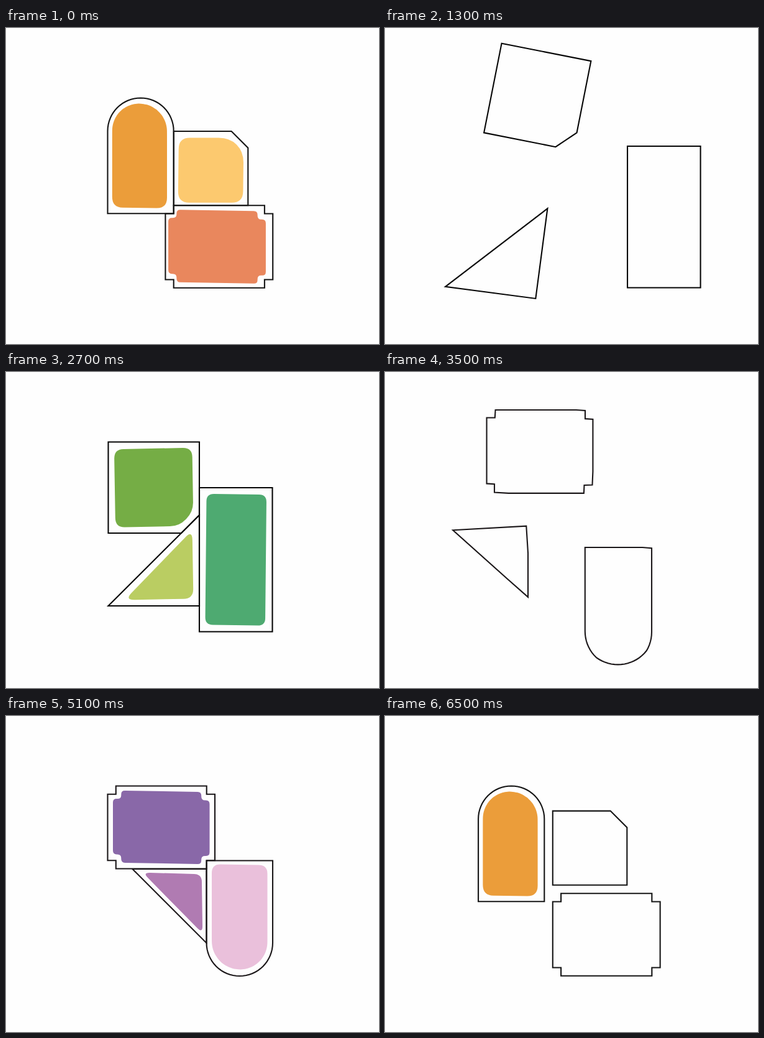
Recreate the animation shown at these times as an HTML page. Size 600 by 508 pixels, loop 6.6 s.

```html
<!DOCTYPE html>
<html lang="en">
<head>
<meta charset="utf-8">
<title>Shape blocks</title>
<style>
html, body { margin: 0; width: 100%; height: 100%; overflow: hidden; background: #fefefe; }
svg { display: block; width: 100%; height: 100%; }
</style>
</head>
<body>
<svg id="stage" viewBox="0 0 600 508"></svg>
<script>
const LOOP = 6600, STEP = 100, GAP = 13.4, HOLD = 100;
const stage = document.getElementById('stage');

// ---- helpers ----
const lerp = (a, b, k) => a + (b - a) * k;
const mix = (p, q, k) => p.map((v, i) => lerp(v, q[i], k));
const dist = (p, q) => Math.hypot(q[0] - p[0], q[1] - p[1]);
const ramp = (t, from, to) => Math.min(1, Math.max(0, (t - from) / (to - from)));
const easeOut = k => 1 - (1 - k) ** 3;
const smooth = k => k * k * (3 - 2 * k);
const around = (pts, i) => [pts.at(i - 1), pts[(i + 1) % pts.length]];

function center(pts) {
  return [0, 1].map(axis => {
    const v = pts.map(p => p[axis]);
    return (Math.min(...v) + Math.max(...v)) / 2;
  });
}

// ---- outlines, all clockwise ----
function arc(cx, cy, r, from) {
  return Array.from({ length: 33 }, (_, i) => {
    const a = from + Math.PI * i / 32;
    return [cx + r * Math.cos(a), cy + r * Math.sin(a)];
  });
}

const box = (x0, y0, x1, y1) => [[x0, y0], [x1, y0], [x1, y1], [x0, y1]];

function arch(x0, y0, x1, y1, down) {
  const r = (x1 - x0) / 2;
  return down
    ? [[x0, y0], [x1, y0], ...arc(x0 + r, y1 - r, r, 0)]
    : [...arc(x0 + r, y0 + r, r, Math.PI), [x1, y1], [x0, y1]];
}

function ticket(x0, y0, x1, y1, n = 13.3) {
  const [l, t, r, b] = [x0 + n, y0 + n, x1 - n, y1 - n];
  return [[x0, t], [l, t], [l, y0], [r, y0], [r, t], [x1, t],
    [x1, b], [r, b], [r, y1], [l, y1], [l, b], [x0, b]];
}

// Box with one corner cut off
function clipped(x0, y0, x1, y1, corner, cut) {
  const pts = box(x0, y0, x1, y1);
  const p = pts[corner];
  pts.splice(corner, 1, ...around(pts, corner).map(q => mix(p, q, cut / dist(p, q))));
  return pts;
}

// ---- fills: inset, lean a little, soften the corners ----
function inset(pts, d) {
  const normal = (p, q) => [(p[1] - q[1]) / dist(p, q), (q[0] - p[0]) / dist(p, q)];
  return pts.map((p, i) => {
    const [prev, next] = around(pts, i);
    const a = normal(prev, p), b = normal(p, next);
    const k = d / (1 + a[0] * b[0] + a[1] * b[1]);
    return [p[0] + k * (a[0] + b[0]), p[1] + k * (a[1] + b[1])];
  });
}

function lean(pts, [ax, ay]) {
  const [cx, cy] = center(pts);
  return pts.map(([x, y]) => [x + ax * (y - cy), y + ay * (x - cx)]);
}

function rounded(pts, r) {
  return pts.map((p, i) => {
    const [a, b] = around(pts, i).map(q => mix(p, q, Math.min(0.5, r / dist(p, q))));
    return `${i ? 'L' : 'M'}${a}Q${p} ${b}`;
  }).join('') + 'Z';
}

// ---- morphing: match both outlines by share of perimeter, keeping all corners ----
function marks(pts) {
  const out = [0];
  pts.forEach((p, i) => out.push(out[i] + dist(p, pts[(i + 1) % pts.length])));
  return out.map(v => v / out[pts.length]);
}

function pointAt(pts, m, s) {
  let i = 0;
  while (i < pts.length - 1 && m[i + 1] <= s) i++;
  return mix(pts[i], pts[(i + 1) % pts.length], (s - m[i]) / (m[i + 1] - m[i]));
}

function morph(a, b, k) {
  if (k >= 1) return b;
  const ma = marks(a), mb = marks(b);
  const stops = [...new Set([...ma, ...mb])].filter(s => s < 1).sort((x, y) => x - y);
  return stops.map(s => mix(pointAt(a, ma, s), pointAt(b, mb, s), k));
}

// ---- scenes ----
const UP = [0, -1], DOWN = [0, 1], LEFT = [-1, 0], RIGHT = [1, 0];

// dir: side of the final gap; out: far pose as dx, dy, turn, height
function piece(line, color, dir, out, { pad, soft, slant = [0, 0], nudge = [0, 0] }) {
  const mid = center(line);
  const local = pts => pts.map(([x, y]) => [x - mid[0], y - mid[1]]);
  const fill = lean(inset(local(line), pad), slant).map(([x, y]) => [x + nudge[0], y + nudge[1]]);
  return { mid, color, dir, out, line: local(line), fill: rounded(fill, soft) };
}

const away = ([x, y], d) => [x * d, y * d, 0, 1];

const green = { start: 1100, out: 1300, join: 2100, fade: 3000, ink: '#050505', from: [1, 0, 2], pieces: [
  piece(clipped(164.5, 112.5, 311, 259, 2, 29), '#75ad45', UP, [7.5, -75, 11.2, 1],
    { pad: 10.5, soft: 15, slant: [0.017, -0.02] }),
  piece([[164.5, 376], [311, 230], [311, 376]], '#bacd62', DOWN, [-58.5, 50, 7.5, 1],
    { pad: 10.5, soft: 16, slant: [0.017, -0.02] }),
  piece(box(311, 186, 428.5, 417.5), '#4eaa71', RIGHT, [79, 2, 0, 0.983],
    { pad: 10.5, soft: 12, slant: [-0.01, 0.014] })
] };

const purple = { start: 3200, out: 3700, join: 4500, fade: 5500, ink: '#1b1719', from: [0, 1, 2], pieces: [
  piece(ticket(163.5, 112.5, 336, 245.5), '#8968a8', UP, away(UP, 55),
    { pad: 8.5, soft: 6, slant: [0, 0.018] }),
  piece([[203.5, 246], [322.5, 246], [322.5, 365]], '#b07bb2', LEFT, away(LEFT, 98),
    { pad: 7, soft: 12, slant: [0.015, 0.03] }),
  piece(arch(322.5, 232.5, 429, 418, true), '#eac0db', DOWN, away(DOWN, 56),
    { pad: 8.5, soft: 14, slant: [0, 0.016], nudge: [0, -2] })
] };

const orange = { start: 5600, out: 6000, join: 6600, fade: 7600, ink: '#151515', from: [0, 1, 2], pieces: [
  piece(arch(163.5, 112.5, 269.7, 298.2), '#eb9d3a', LEFT, away(LEFT, 83),
    { pad: 9, soft: 17, slant: [0, 0.014], nudge: [-1.7, 0] }),
  piece(clipped(269.8, 166, 389.3, 285.2, 1, 26.7), '#fcc96f', UP, away(UP, 83),
    { pad: 7.5, soft: 18, slant: [-0.012, 0], nudge: [0, 3] }),
  piece(ticket(256.4, 285.2, 429.2, 417.8), '#e9875d', RIGHT, away(RIGHT, 83),
    { pad: 8, soft: 6, slant: [0, 0.018], nudge: [-3.3, 0] })
] };

const scenes = [green, purple, orange];
scenes.forEach((scene, n) => scene.pieces.forEach((p, i) => {
  p.prev = scenes.at(n - 1).pieces[scene.from[i]];
  p.origin = [p.prev.mid[0] - p.mid[0], p.prev.mid[1] - p.mid[1], 0, 1];
}));

// Fly out, hold, drift in to a small gap, then snap together
function pose(scene, p, t) {
  if (t >= scene.join) return away(p.dir, 0);
  if (t < scene.out) return mix(p.origin, p.out, easeOut(ramp(t, scene.start, scene.out)));
  const back = ramp(t, scene.out + HOLD, scene.join - 300);
  return mix(p.out, away(p.dir, GAP), smooth(back));
}

function fillAlpha(scene, i, t) {
  if (t < scene.join - (i ? 0 : STEP)) return 0;
  return t < scene.fade ? 1 : t < scene.fade + STEP ? 0.5 : 0;
}

// ---- drawing ----
function add(attrs) {
  const el = document.createElementNS('http://www.w3.org/2000/svg', 'path');
  set(el, attrs);
  return stage.appendChild(el);
}
function set(el, attrs) {
  for (const k in attrs) el.setAttribute(k, attrs[k]);
}
const fills = [0, 1, 2].map(() => add({}));
const lines = [0, 1, 2].map(() => add({ fill: 'none', 'stroke-width': 2.1, 'stroke-miterlimit': 10 }));

function draw(time) {
  let t = Math.floor(time % LOOP / STEP) * STEP;
  if (t < green.start) t += LOOP;
  const scene = scenes.findLast(s => s.start <= t);
  const k = easeOut(ramp(t, scene.start, scene.out));
  const u = ramp(t, scene.join, scene.join + 600);
  const wobble = 0.08 * Math.sin(3 * Math.PI * u) * (1 - u);

  scene.pieces.forEach((p, i) => {
    const [dx, dy, turn, height] = pose(scene, p, t);
    const place = `translate(${p.mid[0] + dx} ${p.mid[1] + dy}) rotate(${turn}) `;
    set(lines[i], {
      d: 'M' + morph(p.prev.line, p.line, k).join('L') + 'Z',
      transform: place + `scale(1 ${height})`,
      stroke: scene.ink
    });
    set(fills[i], {
      d: p.fill,
      transform: place + `scale(${1 - wobble / 3} ${1 + wobble})`,
      fill: p.color,
      opacity: fillAlpha(scene, i, t)
    });
  });
}

const began = performance.now();
function tick() {
  draw(performance.now() - began);
  requestAnimationFrame(tick);
}
tick();
</script>
</body>
</html>
```
